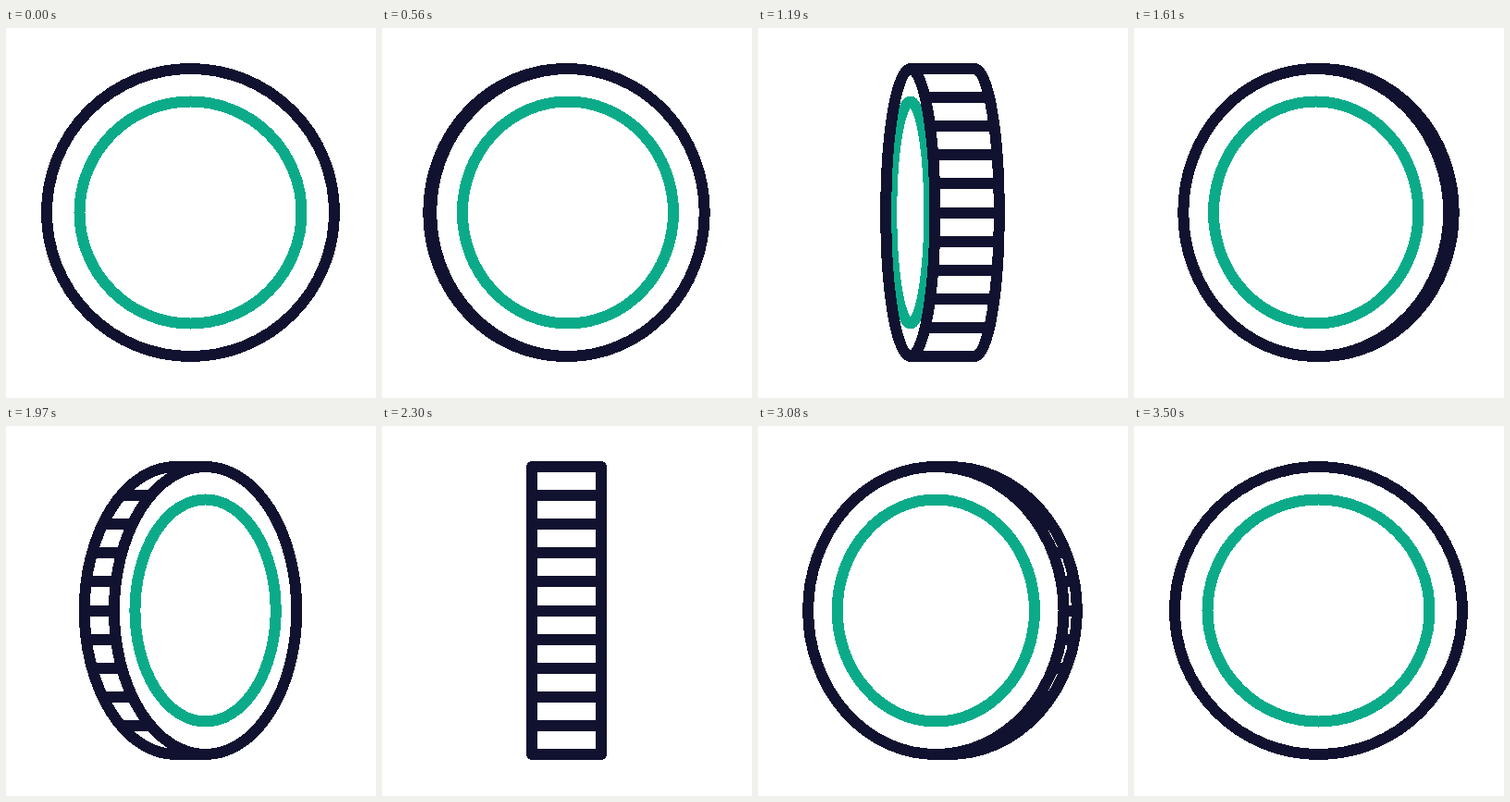
An HTML page for the animation above (3.53 s loop, 400x400 px).

```html
<!DOCTYPE html>
<html lang="en">
<head>
<meta charset="utf-8">
<title>Spinning coin</title>
<style>
  html, body { margin: 0; width: 100%; height: 100%; overflow: hidden; background: #fff; }
  svg { display: block; }
  path {
    fill: none; stroke: #11122f; stroke-width: 12;
    stroke-linejoin: round; shape-rendering: crispEdges;
  }
  #ring { stroke: #0bab8a; }
  #rim { stroke-linecap: round; }
</style>
</head>
<body>
<svg width="400" height="400" viewBox="0 0 400 400">
  <path id="ring"/>
  <path id="rim"/>
  <path id="bars"/>
  <path id="face"/>
</svg>
<script>
const LOOP = 3530, REST = 500, STEP = 30;
const C = 199.5, R = 155.5, RING = 120, DEPTH = 75, BARS = 10;

function bezier(x1, y1, x2, y2) {
  const at = (a, b, s) => 3 * (1 - s) * (1 - s) * s * a + 3 * (1 - s) * s * s * b + s * s * s;
  return x => {
    if (x <= 0) return 0;
    if (x >= 1) return 1;
    let lo = 0, hi = 1;
    for (let i = 0; i < 30; i++) {
      const mid = (lo + hi) / 2;
      if (at(x1, x2, mid) < x) lo = mid; else hi = mid;
    }
    return at(y1, y2, lo);
  };
}

const smooth = bezier(.333, .05, .667, .95);
const closing = bezier(.3, .1, .8, .8);

// Quarter turns: duration, face easing, rim easing; a closing face sits right of its rim.
const turns = [
  { ms: 600, face: closing, rim: smooth, closes: true },
  { ms: 600, face: bezier(.2, .2, .7, .92), rim: smooth },
  { ms: 600, face: closing, rim: smooth, closes: true },
  { ms: 1200, face: bezier(.2, .37, .5, 1), rim: bezier(.17, .17, .64, 1) }
];

function pose(time) {
  let t = Math.max(0, Math.floor((time - REST) / STEP) * STEP);
  let i = 0;
  while (i < turns.length - 1 && t >= turns[i].ms) t -= turns[i++].ms;
  const { ms, face, rim, closes } = turns[i];
  const open = face(t / ms), slid = rim(t / ms);
  return closes
    ? { width: 1 - open, shift: DEPTH * slid / 2 }
    : { width: open, shift: -DEPTH * (1 - slid) / 2 };
}

const setPath = (id, d) => document.getElementById(id).setAttribute('d', d);

const half = (x, rx, ry, sweep) =>
  `M${x} ${C - ry}A${rx} ${ry} 0 0 ${sweep} ${x} ${C + ry}`;

const oval = (x, rx, ry) =>
  `${half(x, rx, ry, 1)}A${rx} ${ry} 0 0 1 ${x} ${C - ry}Z`;

function draw(time) {
  const { width, shift } = pose(time);
  const rx = R * width, front = C + shift, back = C - shift;
  const side = shift > 0 ? -1 : 1;

  let bars = '';
  for (let i = 0; i <= BARS; i++) {
    const v = 2 * i / BARS - 1;
    const edge = side * rx * Math.sqrt(1 - v * v);
    bars += `M${front + edge} ${C + R * v}H${back + edge}`;
  }

  setPath('ring', oval(front, RING * width, RING));
  setPath('rim', half(back, rx, R, side > 0 ? 1 : 0));
  setPath('bars', bars);
  setPath('face', oval(front, rx, R));
}

const start = performance.now();
function tick(now) {
  draw(Math.max(0, now - start) % LOOP);
  requestAnimationFrame(tick);
}
draw(0);
requestAnimationFrame(tick);
</script>
</body>
</html>
```
